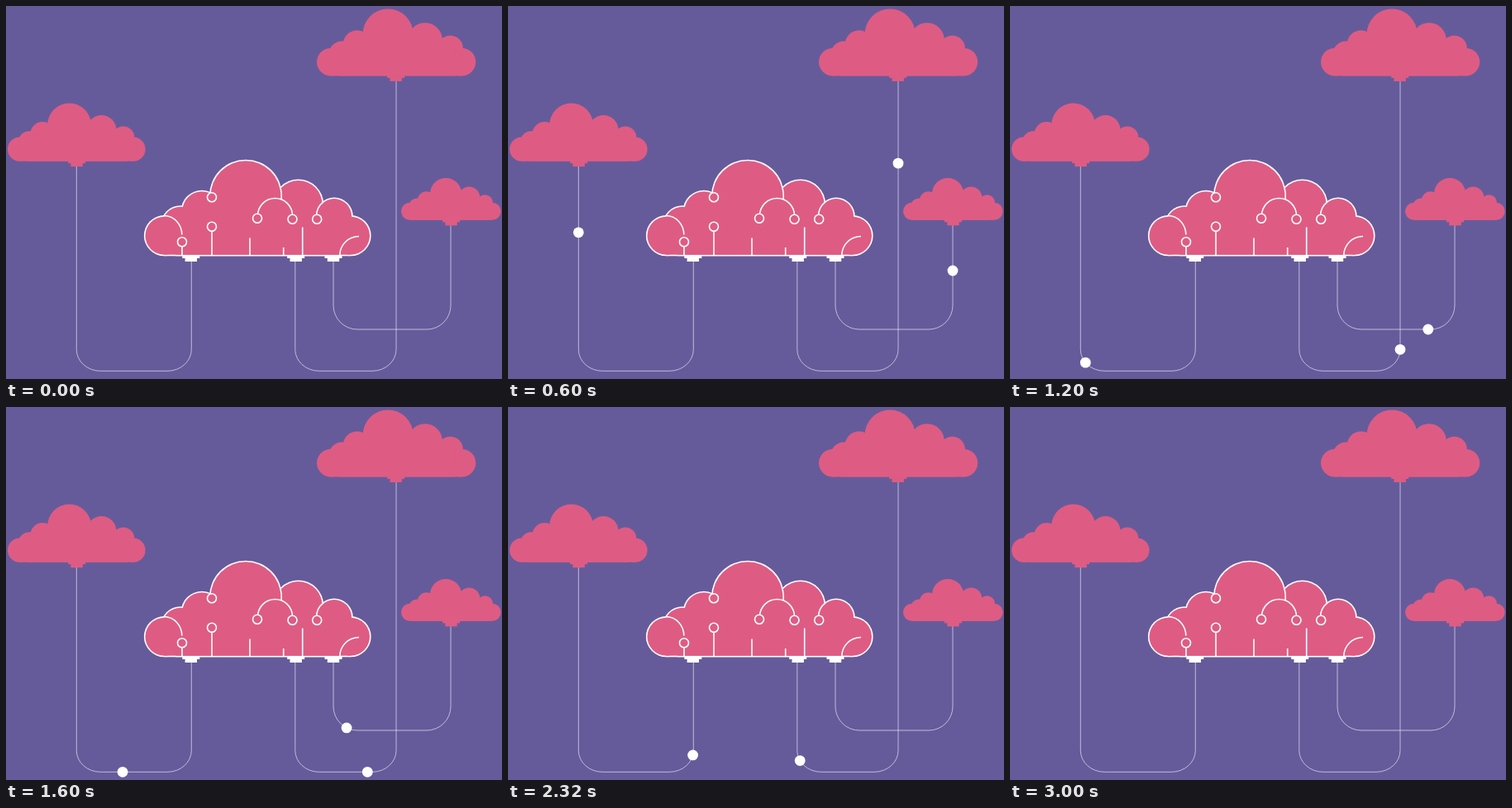
Write an HTML page with a canvas that moves like this. It is 600 px wide and 451 px high and loops after 8 s.

```html
<!DOCTYPE html>
<html lang="en">
<head>
<meta charset="utf-8">
<title>Connected clouds</title>
<style>
html, body { margin: 0; width: 100%; height: 100%; overflow: hidden; background: #655b9b; }
canvas { display: block; }
</style>
</head>
<body>
<canvas id="stage" width="600" height="451"></canvas>
<script>
const ctx = document.getElementById('stage').getContext('2d');
const LOOP = 8000, STEP = 40, REST = 3000;
const PURPLE = '#655b9b', PINK = '#de5c83', WHITE = '#fff';
const TAU = Math.PI * 2;
const CLOUD_LEFT = 167.7, CLOUD_TOP = 186.5, BASE = 301.5;

// Cloud bumps: centre x, centre y, radius
const BUMPS = [
  [191.5, 277.7, 23.8], [211, 265, 23], [237, 248, 24.5], [290, 229.8, 43.3],
  [353.7, 240, 29.7], [397, 254.2, 21.9], [417, 277.7, 23.8]
];

// times: departure, first corner, second corner, arrival
// turn: how far into each corner the ball slows down
const cables = [
  makeCable({ from: 85.3, to: 224.3, top: 152, bottom: 441.3, ry: 26, turn: 0.4, times: [97, 1200, 2090, 3040] }),
  makeCable({ from: 472, to: 349.8, top: 44, bottom: 441.3, ry: 26, turn: 0, times: [150, 1200, 2050, 3000] }),
  makeCable({ from: 538, to: 396, top: 234, bottom: 391, ry: 29, turn: 0.5, times: [129, 990, 1720, 2170] })
];

function makeCable({ from, to, top, bottom, ry, turn, times }) {
  const rx = 29, end = 304, dir = Math.sign(to - from), sweep = dir > 0 ? 0 : 1;
  const d = `M${from} ${top}V${bottom - ry}A${rx} ${ry} 0 0 ${sweep} ${from + dir * rx} ${bottom}` +
    `H${to - dir * rx}A${rx} ${ry} 0 0 ${sweep} ${to} ${bottom - ry}V${end}`;
  const path = document.createElementNS('http://www.w3.org/2000/svg', 'path');
  path.setAttribute('d', d);

  const total = path.getTotalLength();
  const fall = bottom - ry - top, across = Math.abs(to - from) - 2 * rx, rise = bottom - ry - end;
  const corner = (total - fall - across - rise) / 2;
  const first = fall + turn * corner;
  const stops = [0, first, first + corner + across, total];
  return { path, shape: new Path2D(d), times, stops };
}

const ease = u => u * u * (3 - 2 * u);

function ballPosition({ path, times, stops }, t) {
  const next = times.findIndex(time => t < time);
  if (next < 1 || t >= REST) return null;
  const u = (t - times[next - 1]) / (times[next] - times[next - 1]);
  return path.getPointAtLength(stops[next - 1] + (stops[next] - stops[next - 1]) * ease(u));
}

function disc(x, y, r, color) {
  ctx.fillStyle = color;
  ctx.beginPath();
  ctx.arc(x, y, r, 0, TAU);
  ctx.fill();
}

function cloudShape(color, grow = 0) {
  for (const [x, y, r] of BUMPS) disc(x, y, r + grow, color);
  ctx.fillRect(205, 250, 200, BASE - 250 + grow);
  ctx.fillRect(191.5, 277, 225.5, BASE - 277 + grow);
}

function plug(x, y, color, depth) {
  ctx.fillStyle = color;
  ctx.fillRect(x - 10.5, y, 21, depth);
  ctx.fillRect(x - 7.2, y + depth - 0.5, 14.4, 4.5);
}

function smallCloud(x, y, scale, plugX) {
  ctx.save();
  ctx.translate(x, y);
  ctx.scale(scale, scale);
  ctx.translate(-CLOUD_LEFT, -CLOUD_TOP);
  cloudShape(PINK);
  ctx.restore();
  plug(plugX, y + (BASE - CLOUD_TOP) * scale - 1, PINK, 3.5);
}

function arc(x, y, rx, ry, from, to) {
  ctx.moveTo(x + rx * Math.cos(from), y + ry * Math.sin(from));
  ctx.ellipse(x, y, rx, ry, 0, from, to);
}

function mainCloud() {
  cloudShape(WHITE, 0.8);
  cloudShape(PINK, -0.8);

  ctx.strokeStyle = WHITE;
  ctx.lineWidth = 1.6;
  ctx.beginPath();
  arc(191, 276.5, 21.8, 23, -Math.PI / 2, 0);
  arc(290, 229.8, 43.3, 43.3, -0.25, 0.08);
  arc(397, 254.2, 21.5, 21.9, Math.PI, Math.PI * 1.29);
  arc(325.5, 253.5, 21, 21, Math.PI, TAU);
  arc(427, BASE, 23.2, 23, Math.PI, Math.PI * 1.5);
  for (const [x, y] of [[213, 290], [249, 272], [295, 280.5], [335.7, 292], [358.7, 267.5]]) {
    ctx.moveTo(x, y);
    ctx.lineTo(x, BASE);
  }
  ctx.stroke();

  for (const [x, y] of [[213, 285.3], [249, 231.3], [249, 266.7], [304, 256.8], [346.5, 257.8], [376.2, 257.8]]) {
    disc(x, y, 5.5, PINK);
    ctx.stroke();
  }
  for (const x of [223.8, 350.7, 396]) plug(x, 301, WHITE, 4);
}

function draw(t) {
  ctx.fillStyle = PURPLE;
  ctx.fillRect(0, 0, 600, 451);

  ctx.strokeStyle = 'rgba(255,255,255,0.58)';
  ctx.lineWidth = 1;
  for (const cable of cables) ctx.stroke(cable.shape);

  for (const cable of cables) {
    const p = ballPosition(cable, t);
    if (p) disc(p.x, p.y, 6.4, WHITE);
  }

  smallCloud(2, 117.5, 0.61, 85.6);
  smallCloud(376, 3.5, 0.704, 471.7);
  smallCloud(478, 208, 0.442, 538.5);
  mainCloud();
}

const start = performance.now();
function tick() {
  const t = (performance.now() - start) % LOOP;
  draw(Math.floor(t / STEP) * STEP);
  requestAnimationFrame(tick);
}
tick();
</script>
</body>
</html>
```
